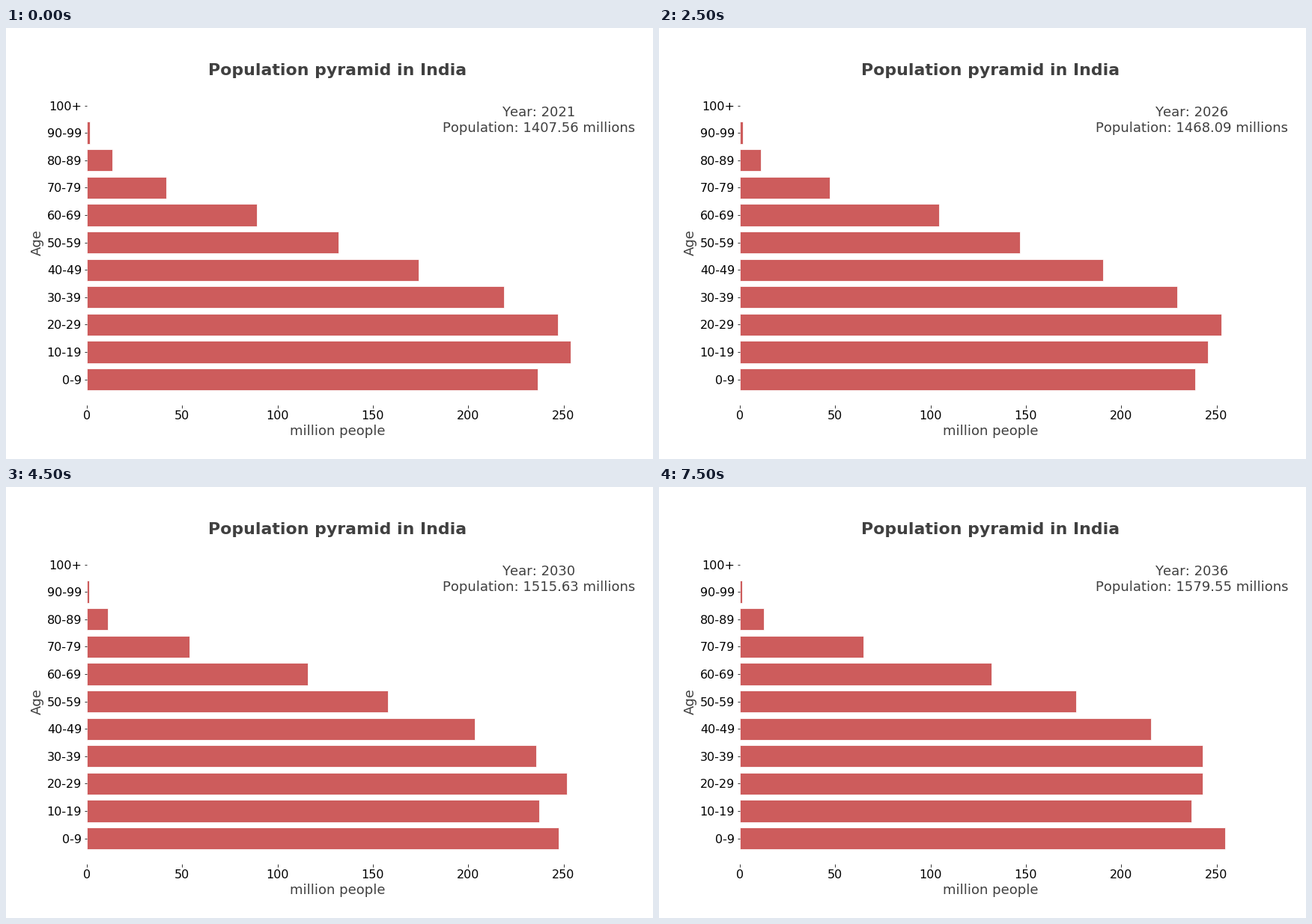
Animation, 864 px wide and 576 px high, one loop 8 s. Source, as a matplotlib script:

```python
import matplotlib.pyplot as plt
import numpy as np
from matplotlib.animation import FuncAnimation

START, FRAMES, INTERVAL = 2021, 16, 500
GREY = "#404040"

# Millions of people per age group in four key years; cubics join them
KEY_YEARS = 2021, 2026, 2030, 2036
GROUPS = {
    "0-9": (236.4, 238.8, 247.4, 254.5),
    "10-19": (253.7, 245.5, 237.2, 236.8),
    "20-29": (247.1, 252.6, 251.8, 242.7),
    "30-39": (218.8, 229.4, 235.7, 242.7),
    "40-49": (174.0, 190.5, 203.5, 215.6),
    "50-59": (132.0, 146.9, 157.9, 176.4),
    "60-69": (89.2, 104.5, 115.9, 132.0),
    "70-79": (41.6, 47.1, 54.0, 64.8),
    "80-89": (13.4, 11.1, 10.9, 12.5),
    "90-99": (1.7, 1.6, 1.3, 1.2),
    "100+": (0, 0, 0, 0),
}
TOTALS = {2021: 1407.56, 2024: 1443.77, 2026: 1468.09, 2028: 1492.16,
          2030: 1515.63, 2034: 1559.54, 2036: 1579.55}


def curve(years, values):
    """Polynomial through the key points, sampled once per year."""
    x = np.array(list(years)) - START
    coeffs = np.polyfit(x, list(values), len(x) - 1)
    return np.polyval(coeffs, np.arange(FRAMES))


sizes = [curve(KEY_YEARS, v) for v in GROUPS.values()]
totals = curve(TOTALS.keys(), TOTALS.values())

plt.rcParams["font.family"] = "DejaVu Sans"
plt.rcParams["text.kerning_factor"] = 6
fig = plt.figure(figsize=(12, 8), dpi=72, facecolor="white")
fig.subplots_adjust(left=0.125, right=0.9, bottom=0.125, top=0.88)
ax = fig.add_subplot()

bars = ax.barh(list(GROUPS), [s[0] for s in sizes], height=0.8,
               color="indianred", edgecolor="white", linewidth=0.8)
ax.set_xlim(0, 263)
ax.set_ylim(-0.94, 10.94)
ax.set_xticks(range(0, 251, 50))
ax.tick_params(labelsize=16)
for spine in ax.spines.values():
    spine.set_visible(False)

ax.set_title("Population pyramid in India", fontsize=22,
             fontweight="bold", color=GREY)
ax.set_xlabel("million people", fontsize=18, color=GREY)
ax.set_ylabel("Age", fontsize=18, color=GREY)
note = ax.text(237, 9.03, "", fontsize=18, color=GREY, ha="center")


def update(step):
    for bar, size in zip(bars, sizes):
        bar.set_width(size[step])
    note.set_text(f"Year: {START + step}\n"
                  f"Population: {totals[step]:.2f} millions")
    return [*bars, note]


anim = FuncAnimation(fig, update, frames=FRAMES, interval=INTERVAL,
                     repeat=True, repeat_delay=0)
plt.show()
```
